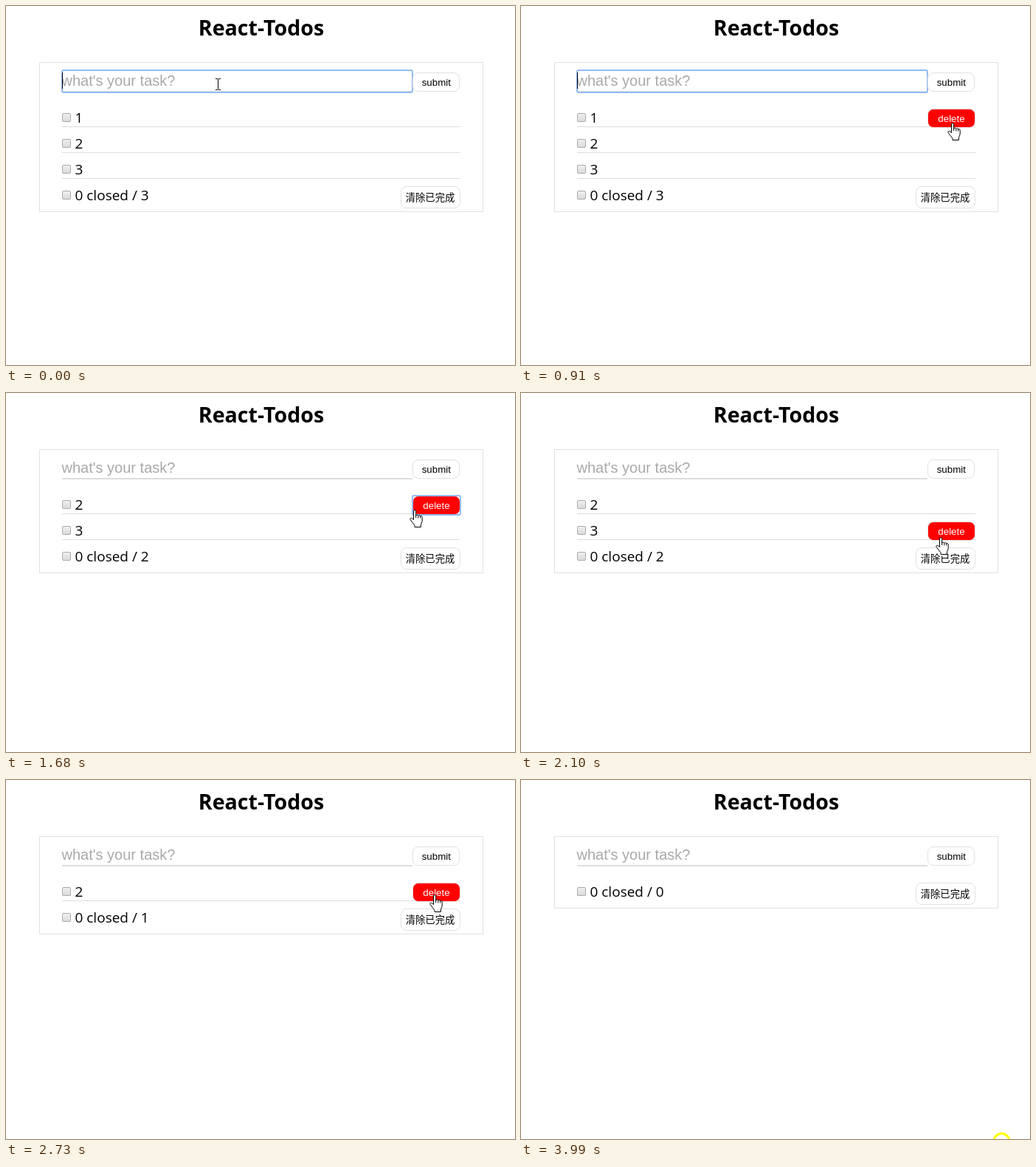
An HTML page for the animation above (4.06 s loop, 690 by 486 pixels).

```html
<!DOCTYPE html>
<html lang="zh-CN">
<head>
<meta charset="utf-8">
<title>React-Todos</title>
<style>
  html, body { margin: 0; width: 100%; height: 100%; overflow: hidden; background: #fff; }
  svg { display: block; }
  .title { font: bold 28.6px "Open Sans", "Noto Sans", sans-serif; text-anchor: middle; }
  .label { font: 19px "Open Sans", "Noto Sans", sans-serif; }
  .hint { font: 20px "Liberation Sans", Arial, sans-serif; fill: #a9a9a9; }
  .btn { font: 13.333px "Liberation Sans", Arial, "Noto Sans CJK SC", "Noto Sans CJK", sans-serif; text-anchor: middle; }
  .edge { fill: none; stroke: #e1e1e1; }
  .ring { fill: none; stroke: #94bbf6; stroke-width: 2; }
</style>
</head>
<body>
<svg id="stage" width="690" height="486" viewBox="0 0 690 486">
  <defs>
    <linearGradient id="shade" x2="0" y2="1">
      <stop stop-color="#f0f0f0"/><stop offset="1" stop-color="#dadada"/>
    </linearGradient>
    <rect id="box" x="76.5" y="145.5" width="11" height="11" rx="1.5" fill="url(#shade)" stroke="#aaa"/>
    <path id="beam" d="M-3 -7.5h3m1 0h3M.5 -7v14M-3 7.5h3m1 0h3" fill="none" stroke="#000"/>
    <path id="arrow" d="M.5 .5V16.5L4 13 6.5 18.5 8.8 17.5 6.4 12H11.5z" fill="#fff" stroke="#000"/>
    <g id="hand" transform="translate(-7)" stroke="#000" stroke-linejoin="round">
      <path fill="#fff" d="M5.5 13.5V2.2a1.6 1.6 0 0 1 3.2 0V8.2c.2-1.5 2.9-1.5 3.2.2 .5-1.2 2.7-1 2.9.6 .6-.9 2.4-.6 2.4 1.3V15c0 2-1.8 4-1.8 6V23.5H7V21.3C5 18.5 3 16 1.2 13.6c-1.2-1.8.8-3 2.3-1.8z"/>
      <path fill="none" d="M8.7 8v3M11.9 8.5v3M14.8 9v2.5"/>
    </g>
  </defs>
  <text class="title" x="346" y="40">React-Todos</text>
  <g id="view"></g>
</svg>
<script>
const LOOP = 4060, TICK = 70, ROW = 35;
const view = document.getElementById('view');

// Each move eases the pointer from where it rests to a new point.
const home = { x: 287, y: 106 };
const moves = [
  { from: 420, until: 910, x: 585, y: 158 },
  { from: 980, until: 1050, x: 585, y: 156 },
  { from: 1610, until: 1680, x: 554, y: 158 },
  { from: 1680, until: 2170, x: 570, y: 197 },
  { from: 2380, until: 2730, x: 581, y: 155 },
  { from: 3150, until: 3360, x: 566, y: 161 },
  { from: 3360, until: 3710, x: 640, y: 427 },
  { from: 3710, until: 3850, x: 660, y: 509 }
];
// Every click deletes the task under the pointer on release.
const clicks = [
  { down: 1400, up: 1540, task: '1' },
  { down: 2310, up: 2380, task: '3' },
  { down: 3010, up: 3080, task: '2' }
];

const smooth = f => f * f * (3 - 2 * f);
const clamp = f => Math.max(0, Math.min(1, f));
const inside = (p, x, y, w, h) => p.x >= x && p.x < x + w && p.y >= y && p.y < y + h;

function pointerAt(t) {
  let { x, y } = home;
  for (const m of moves) {
    const f = smooth(clamp((t - m.from) / (m.until - m.from)));
    x += (m.x - x) * f;
    y += (m.y - y) * f;
  }
  return { x: Math.round(x), y: Math.round(y) };
}

const rect = (x, y, w, h, attrs) => `<rect x="${x}" y="${y}" width="${w}" height="${h}" ${attrs}/>`;
const text = (cls, x, y, str, fill = '#000') => `<text class="${cls}" x="${x}" y="${y}" fill="${fill}">${str}</text>`;
const ring = (x, y, w, h) => rect(x, y, w, h, 'class="ring" rx="2"');
const button = (x, y, w, h, fill) => rect(x + .5, y + .5, w - 1, h - 1, `rx="7.5" stroke="#e1e1e1" fill="${fill}"`);
const line = (str, dy) => `<use href="#box" y="${dy}"/>` + text('label', 93.5, 158 + dy, str);

function inputField(t) {
  const caret = t < 490 || (t >= 700 && t < 1190);
  let s = rect(76, 115, 475, 2, 'fill="#ddd"') + text('hint', 75.5, 108, "what's your task?");
  if (t < clicks[0].down) {
    s += ring(76, 87, 475, 30);
    if (caret) s += rect(76, 90, 1, 22, 'fill="#000"');
  }
  return s + button(551, 90, 64, 26, '#fff') + text('btn', 583.3, 108, 'submit');
}

function deleteButton(y, focused) {
  return button(551, y, 65, 26, '#f00') + (focused ? ring(551, y, 65, 26) : '') +
    text('btn', 583.5, y + 18, 'delete', '#fff');
}

function scene(t) {
  const p = pointerAt(t);
  const gone = clicks.filter(c => t >= c.up).map(c => c.task);
  const tasks = ['1', '2', '3'].filter(task => !gone.includes(task));
  const focused = clicks.some(c => t >= c.down && t <= c.down + 280);
  const end = tasks.length * ROW;
  let cursor = inside(p, 76, 87, 475, 31) ? 'beam' : 'arrow';

  let s = rect(45.5, 76.5, 601, 97 + end, 'class="edge"') + inputField(t);
  tasks.forEach((task, i) => {
    const dy = i * ROW;
    s += line(task, dy) + rect(76, 163 + dy, 540, 1, 'fill="#ddd"');
    if (inside(p, 76, 129 + dy, 540, ROW)) s += deleteButton(139 + dy, focused);
    if (inside(p, 551, 139 + dy, 65, 26)) cursor = 'hand';
  });

  const hot = cursor !== 'hand' && inside(p, 535, 139 + end, 81, 30);
  if (hot) cursor = 'hand';
  s += line(`0 closed / ${tasks.length}`, end);
  s += button(535, 139 + end, 81, 30, hot ? '#9acd32' : '#fff');
  s += text('btn', 575, 159 + end, '清除已完成', hot ? '#fff' : '#000');

  if (t >= 3990) s += '<circle cx="651.5" cy="489" r="10.5" fill="none" stroke="#ff0" stroke-width="3"/>';
  return s + `<use href="#${cursor}" x="${p.x}" y="${p.y}"/>`;
}

let shown = -1;
function draw() {
  const t = Math.floor(performance.now() % LOOP / TICK) * TICK;
  if (t !== shown) view.innerHTML = scene(shown = t);
  requestAnimationFrame(draw);
}
draw();
</script>
</body>
</html>
```
